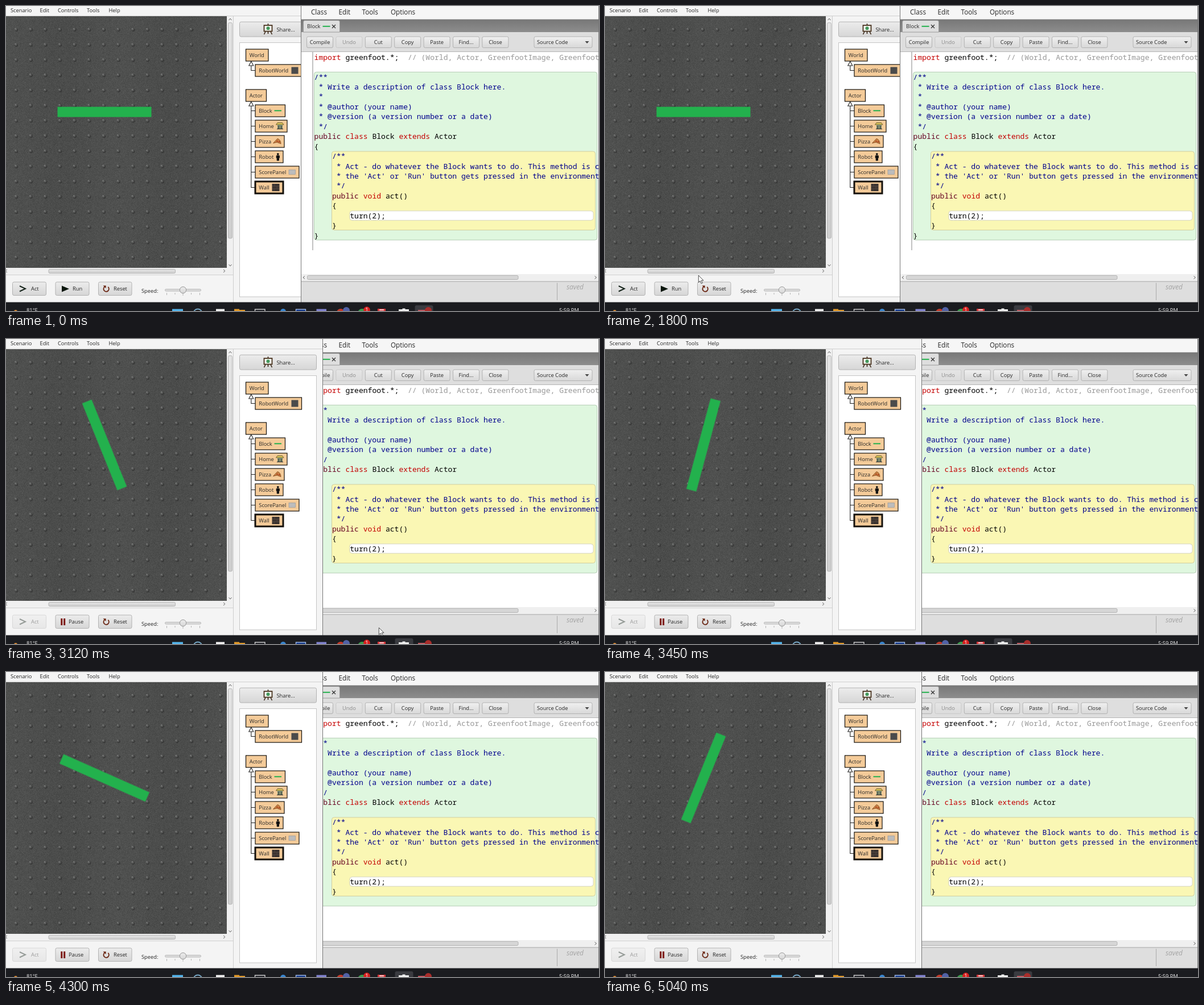
These frames come from a looping animation (1042 px wide and 537 px high, 5100 ms). An HTML page with a canvas:

```html
<!DOCTYPE html>
<html lang="en">
<head>
<meta charset="utf-8">
<title>Turning block</title>
<style>
html, body { margin: 0; width: 100%; height: 100%; overflow: hidden; background: #fff; }
#stage { position: relative; width: 1042px; height: 537px; overflow: hidden; }
#stage > *, #left > * { position: absolute; left: 0; top: 0; display: block; }
#left { width: 518px; height: 522px; overflow: hidden; animation: raise 5.1s step-end infinite; }
#left #floor { top: 18px; }
text { font: 9.3px "Open Sans", "Noto Sans", sans-serif; fill: #262626; white-space: pre; }
.big text { font-size: 11.7px; }
.code text { font: 13.06px "Noto Sans Mono", "DejaVu Sans Mono", monospace; fill: #000; }
.code .k { fill: #c40000; }
.code .p { fill: #660022; }
.code .d { fill: #00008c; }
.code .g { fill: #989898; }
.saved { font-size: 11.8px; font-style: italic; fill: #a4a4a4; }
#block { transform-origin: 173px 186.5px; animation: turn 5.1s infinite; }
#cursor { animation: point 5.1s infinite; }
#run { animation: run-button 5.1s step-end infinite; }
#pause { animation: pause-button 5.1s step-end infinite; }
#act { animation: dim 5.1s step-end infinite; }
#press { animation: press 5.1s step-end infinite; mix-blend-mode: multiply; }
#active { animation: active 5.1s step-end infinite; }

@keyframes raise { 0% { width: 518px } 48.4%, 100% { width: 557px } }
@keyframes run-button { 0% { opacity: 1 } 49.8%, 100% { opacity: 0 } }
@keyframes pause-button { 0% { opacity: 0 } 49.8%, 100% { opacity: 1 } }
@keyframes dim { 0% { opacity: 1 } 49.8%, 100% { opacity: .42 } }
@keyframes press { 0% { opacity: 0 } 48.4% { opacity: 1 } 49.8%, 100% { opacity: 0 } }
@keyframes active { 0% { transform: translateX(35px) } 48.4% { transform: none } 92%, 100% { transform: translateX(35px) } }
@keyframes turn {
  0% { transform: rotate(0deg); animation-timing-function: step-end }
  48.4% { transform: rotate(0deg); animation-timing-function: steps(9) }
  61.1% { transform: rotate(68deg); animation-timing-function: steps(10) }
  74.05% { transform: rotate(142deg); animation-timing-function: steps(8) }
  84.25% { transform: rotate(204deg); animation-timing-function: steps(11) }
  98.75%, 100% { transform: rotate(292deg) }
}
@keyframes point {
  0% { transform: translate(-50px, -50px); animation-timing-function: step-end }
  3.9% { transform: translate(1021px, 520px); animation-timing-function: steps(3) }
  7.8% { transform: translate(560px, 320px); animation-timing-function: steps(4) }
  13.1% { transform: translate(233px, 226px); animation-timing-function: step-end }
  14.45% { transform: translate(245px, 252px); animation-timing-function: step-end }
  15.8% { transform: translate(294px, 288px); animation-timing-function: step-end }
  17.2% { transform: translate(261px, 252px); animation-timing-function: step-end }
  22.3% { transform: translate(273.5px, 262px); animation-timing-function: steps(4) }
  27.4% { transform: translate(334px, 345px); animation-timing-function: steps(3) }
  31.3% { transform: translate(263px, 426px); animation-timing-function: steps(5) }
  37.7% { transform: translate(98px, 506px); animation-timing-function: step-end }
  39% { transform: translate(116px, 509px); animation-timing-function: step-end }
  42.9% { transform: translate(112px, 505px); animation-timing-function: step-end }
  44.3% { transform: translate(109px, 499.5px); animation-timing-function: step-end }
  49.8% { transform: translate(109px, 499.5px); animation-timing-function: steps(5) }
  56.2% { transform: translate(742px, 490px); animation-timing-function: step-end }
  58.2% { transform: translate(655px, 508px); animation-timing-function: step-end }
  65%, 100% { transform: translate(-50px, -50px) }
}
</style>
</head>
<body>
<div id="stage">
  <svg id="editor" width="1042" height="537"></svg>
  <div id="left">
    <canvas id="floor" width="388" height="443"></canvas>
    <svg id="scene" width="557" height="522"></svg>
  </div>
  <svg id="taskbar" width="1042" height="537"></svg>
  <svg width="1042" height="537">
    <path id="cursor" d="M.3 .3V12.6L3.1 10L5.1 14.6L7.2 13.7L5.2 9.2H9Z" fill="#fff" stroke="#222" stroke-width=".8"/>
  </svg>
</div>
<script>
const $ = id => document.getElementById(id);
const rect = (x, y, x2, y2, fill, more = '') =>
  `<rect x="${x}" y="${y}" width="${x2 - x}" height="${y2 - y}" fill="${fill}" ${more}/>`;
const path = (d, stroke, width = 1, fill = 'none') =>
  `<path d="${d}" stroke="${stroke}" stroke-width="${width}" fill="${fill}"/>`;
const dot = (x, y, r, fill, more = '') => `<circle cx="${x}" cy="${y}" r="${r}" fill="${fill}" ${more}/>`;
const label = (x, y, s, more = '') => `<text x="${x}" y="${y}" ${more}>${s}</text>`;
const mid = 'text-anchor="middle"';
const face = (id, a, b) => `<linearGradient id="${id}" x2="0" y2="1"><stop stop-color="${a}"/><stop offset="1" stop-color="${b}"/></linearGradient>`;
const button = (x, y, x2, y2, fill) => rect(x + .5, y + .5, x2 - .5, y2 - .5, fill, 'rx="2.5" stroke="#b2b2b2"');

// Metal floor
function drawFloor() {
  const c = $('floor').getContext('2d'), w = 388, h = 443;
  const img = c.createImageData(w, h);
  let seed = 7;
  const rnd = () => (seed = (seed * 1664525 + 1013904223) >>> 0) / 4294967296;
  for (let i = 0; i < w * h; i++) {
    const v = 77 + (rnd() + rnd() - 1) * 11 + 2 * Math.cos(i % w / 31);
    img.data.set([v, v + 1, v, 255], i * 4);
  }
  c.putImageData(img, 0, 0);
  const spot = (x, y, r, color) => {
    c.fillStyle = color;
    c.beginPath();
    c.arc(x, y, r, 0, 7);
    c.fill();
  };
  for (let j = 0; j < 16; j++) for (let i = 0; i < 15; i++) {
    const x = 17.5 + i * 25.65, y = 23 + j * 26.75;
    spot(x + .9, y + 1.1, 2.9, 'rgba(38,38,38,.5)');
    spot(x - .3, y - .2, 2.4, '#5a5b5a');
    spot(x - .9, y - .9, 1, '#7e7f7e');
  }
}

function drawScene() {
  let s = '<defs>' + face('btn', '#ececec', '#d6d6d6') + face('bar', '#e4e4e4', '#cecece') + '</defs>';
  s += '<clipPath id="view"><rect y="18" width="388" height="443"/></clipPath>';
  s += '<g clip-path="url(#view)">' + rect(90.5, 177.5, 255.5, 195.5, '#23b14d', 'id="block"') + '</g>';
  s += rect(0, 0, 557, 18, '#f4f4f4') + path('M0 17.5H557', '#cfcfcf');
  [[8, 'Scenario'], [59.5, 'Edit'], [91, 'Controls'], [142, 'Tools'], [180.5, 'Help']]
    .forEach(([x, t]) => s += label(x, 11.3, t));

  // Scrollbars and controls
  s += rect(388, 18, 400, 473, '#f0f0f0') + rect(0, 461, 400, 473, '#f0f0f0') + rect(0, 473, 400, 522, '#f4f4f4');
  s += rect(390.5, 29.5, 397.5, 409, 'url(#bar)', 'rx="2" stroke="#b4b4b4"');
  s += rect(75, 463.5, 297.5, 470.5, 'url(#bar)', 'rx="2" stroke="#b4b4b4"');
  s += path('M391.5 25l2.5-3 2.5 3M391.5 455l2.5 3 2.5-3M382 464l3 2.5-3 2.5M2 464l-3 2.5 3 2.5', '#666');
  s += path('M0 473.5H400', '#d0d0d0');
  s += '<g id="act">' + button(11, 485.5, 71, 510, 'url(#btn)') + path('M24 493L34 497.7L24 502.5', '#16241b', 2) + label(44, 501.3, 'Act') + '</g>';
  s += button(86.5, 485.5, 146.5, 510, 'url(#btn)') + button(162, 485.5, 221.5, 510, 'url(#btn)');
  s += '<g id="run">' + path('M98 492.5L111 498L98 503.5Z', 'none', 0, '#0b160d') + label(117, 501.3, 'Run') + '</g>';
  s += '<g id="pause">' + rect(96.3, 492, 99.3, 504, '#7c1712') + rect(101.2, 492, 104.2, 504, '#7c1712') + label(110, 501.3, 'Pause') + '</g>';
  s += path('M173.5 494.2A4.7 4.7 0 1 0 179.3 494.6', '#6b2714', 1.8) + path('M170.5 492.2H175.6V497Z', 'none', 0, '#6b2714');
  s += label(189, 501.3, 'Reset') + label(238, 504.5, 'Speed:');
  s += rect(279.5, 498.5, 342.5, 502, '#dcdcdc', 'rx="1.7" stroke="#b9b9b9"');
  s += path('M282.5 505v4M297 505v3M311 506v4M325.5 505v3M340.5 505v4', '#b4b4b4') + dot(311, 500, 5.7, 'url(#btn)', 'stroke="#999"');
  s += '<g id="press">' + rect(87, 486, 146, 509.5, '#ececec', 'rx="2.5"') + dot(108.5, 500, 11.5, '#fdf550') + '</g>';

  // Class diagram
  s += rect(400, 18, 557, 522, '#f4f4f4') + path('M399.5 18V522', '#cdcdcd');
  s += button(410, 27.5, 546, 54.5, 'url(#btn)') + label(475.5, 44.6, 'Share...');
  s += path('M460.5 31V34M456 45L453.5 50M465 45L467.5 50M460.5 45V49', '#3d2b1c', 1.6);
  s += rect(453.5, 34, 467.5, 44.5, '#f3f7ef', 'stroke="#4a3320" stroke-width="1.8"') + dot(460.5, 39.3, 3, '#42975b');
  s += rect(410.5, 64.5, 545.5, 512, '#fff', 'stroke="#c4c4c4"');
  s += path('M430.8 104V113.5H438M430.8 176V319.5H438M430.8 184.5H438M430.8 211.5H438M430.8 238.5H438M430.8 265.5H438M430.8 292.5H438', '#222', 1.1);
  s += path('M430.8 97.5L434.8 105H426.8ZM430.8 168.5L434.8 176H426.8Z', '#222', 1.1, '#fff');
  const node = (x, x2, y, t, w = 1.2) => {
    s += rect(x, y - 10.5, x2, y + 10.5, '#f4cb99', `stroke="#15110c" stroke-width="${w}"`) + label(x + 6.3, y + 3.4, t);
  };
  node(421.5, 461, 86.5, 'World');
  node(438, 519.5, 113.5, 'RobotWorld');
  node(421.5, 457.5, 157.5, 'Actor');
  [['Block', 490.5], ['Home', 494], ['Pizza', 489], ['Robot', 487], ['ScorePanel', 515], ['Wall', 487]]
    .forEach(([t, x2], i) => node(438, x2, 184.5 + i * 27, t, i == 5 ? 3 : 1.2));
  s += rect(501.5, 107.5, 513.5, 119.5, '#4b4b4b') + path('M471.5 184.3H484', '#23b14d', 2);
  s += path('M474.5 209L477 205.5H485.5L488 209Z', '#554a1c', .8, '#d9c45b') + rect(477, 209, 486, 216, '#7d8c70') + path('M476 216.5H487M479 211V216M484 211V216', '#333');
  s += path('M469.5 241.5L477 233.5Q482.5 235 483 242.5L476 240Z', '#7a3d14', .8, '#c88345') + dot(476.5, 238, 1.1, '#a52a18') + dot(480, 239, 1.1, '#a52a18');
  s += dot(477.8, 260.8, 1.9, '#111') + path('M475.2 263.5H480.4V267.5H479.4V272H476.2V267.5H475.2Z', '#111', 1, '#111');
  s += rect(497, 288.5, 508.5, 296.5, '#bcbcbc', 'stroke="#999" stroke-width=".7"');
  s += rect(467.5, 313, 480.5, 326, '#3b3330') + path('M468 317.5H480M468 321.5H480M472 313V317M476 317V321M471 322V326', '#594c46', .7);
  s += path('M556.5 0V522', '#777');
  $('scene').innerHTML = s;
}

function drawEditor() {
  let s = '<defs>' + face('tool', '#f0f0f0', '#d8d8d8') + face('tabs', '#777', '#8d8d8d') + '</defs>';
  s += rect(518, 0, 1042, 522, '#dedede') + rect(518, 0, 1042, 23.5, '#f6f6f6') + rect(518, 23.5, 1042, 46, 'url(#tabs)');
  s += '<g class="big">';
  [[536, 'Class'], [584.5, 'Edit'], [625.5, 'Tools'], [676, 'Options']].forEach(([x, t]) => s += label(x, 15, t));
  s += '</g>';
  s += path('M522.5 46V28Q522.5 25.5 525 25.5H584Q586.5 25.5 586.5 28V46Z', '#999', 1, '#dedede');
  s += label(529, 39, 'Block') + path('M556.5 35.8H569.5', '#23b14d', 2) + path('M573 33L579 39M579 33L573 39', '#333', 1.3);
  ['Compile', 'Undo', 'Cut', 'Copy', 'Paste', 'Find...', 'Close'].forEach((t, i) => {
    const x = 528 + i * 51.4;
    s += `<g opacity="${i == 1 ? .45 : 1}">` + button(x, 53.5, x + 47, 74, 'url(#tool)') + label(x + 23.5, 67.2, t, mid) + '</g>';
  });
  s += button(927.5, 53.5, 1030.5, 74, 'url(#tool)') + label(933, 67.2, 'Source Code') + path('M1017.5 62H1024.5L1021 66Z', 'none', 0, '#444');

  // Code area
  s += rect(518, 80.5, 1041, 472, '#fff') + path('M518 80.5H1042', '#b4b4b4') + path('M539 81V430', '#858585');
  s += rect(541.5, 116.3, 1038.8, 412, '#dff7df', 'rx="4" stroke="#b3cbb3"');
  s += rect(572.5, 256, 1035.5, 394.5, '#faf7b4', 'rx="4" stroke="#d1cea0"');
  s += rect(604, 360.8, 1032, 377.3, '#fff', 'rx="4" stroke="#d6d5bd"');
  const span = (c, t) => `<tspan class="${c}">${t}</tspan>`;
  const doc = t => span('d', t);
  const lines = [
    span('k', 'import') + ' greenfoot.*;  ' + span('g', '// (World, Actor, GreenfootImage, Greenfoot and MouseInfo)'),
    '',
    doc('/**'),
    doc(' * Write a description of class Block here.'),
    doc(' *'),
    doc(' * @author (your name)'),
    doc(' * @version (a version number or a date)'),
    doc(' */'),
    span('p', 'public') + ' ' + span('k', 'class') + ' Block ' + span('k', 'extends') + ' Actor',
    '{',
    doc('    /**'),
    doc('     * Act - do whatever the Block wants to do. This method is called whenever'),
    doc("     * the 'Act' or 'Run' button gets pressed in the environment."),
    doc('     */'),
    '    ' + span('p', 'public') + ' ' + span('k', 'void') + ' act()',
    '    {',
    '        turn(2);',
    '    }',
    '}'
  ];
  s += '<g class="code">' + lines.map((t, i) => label(541.6, 94.6 + i * 17.45, t)).join('') + '</g>';

  // Scrollbar and status
  s += rect(518, 472, 1042, 485, '#efefef') + rect(529.5, 474.5, 900, 481.5, '#d6d6d6', 'rx="2" stroke="#b2b2b2"');
  s += path('M525 475.5L522 478L525 480.5M1034.5 475.5L1037.5 478L1034.5 480.5', '#666');
  s += path('M518 485H1042', '#a5a5a5') + path('M968.5 487.5V518', '#aaa') + label(985, 499, 'saved', 'class="saved"');
  s += path('M518.5 0V522M1041.5 0V522', '#777');
  $('editor').innerHTML = s;
}

function drawTaskbar() {
  let s = rect(0, 521.5, 1042, 537, '#1b1c20');
  s += rect(683.5, 527, 715.5, 540, '#3a3b40', 'rx="3" id="active"');
  s += label(36, 538.6, '81°F', 'style="fill:#eee"') + label(972, 538.6, '5:59 PM', 'style="fill:#eee"');
  s += dot(17, 538, 3, '#d88a35') + rect(292, 533.5, 311, 537, '#55b5ec') + dot(337, 541, 7.5, 'none', 'stroke="#77a9c8" stroke-width="1.8"');
  s += rect(369, 533.5, 384, 537, '#f2f2f2') + rect(401, 533.5, 410, 537, '#e29a2b') + rect(409, 535, 420, 537, '#e29a2b');
  s += rect(437.5, 534, 455, 540, '#24252b', 'stroke="#ddd" stroke-width="1.3"') + dot(487, 538, 5, '#3a86cf');
  s += rect(509.5, 534, 526.5, 540, '#15398a', 'stroke="#a9c2ee" stroke-width="1.3"') + rect(545.5, 533.5, 563, 537, '#8284d0');
  s += dot(588, 540, 7, '#c33b2b') + dot(598, 536, 6, '#5262a6') + dot(626, 541, 8, '#3d9a4d') + dot(634, 535, 5.8, '#d7201f');
  s += label(634, 538, '1', mid + ' style="fill:#fff"') + rect(653, 533, 667, 537, '#d8383c') + path('M656 535H664', '#fff', 1.5);
  s += rect(690, 534, 708, 537, '#efefef') + rect(696.5, 532.5, 701.5, 537, '#efefef');
  s += rect(724, 535, 737, 537, '#bf5a62') + dot(742, 536, 6, '#a92d2b');
  $('taskbar').innerHTML = s;
}

drawFloor();
drawScene();
drawEditor();
drawTaskbar();
</script>
</body>
</html>
```
